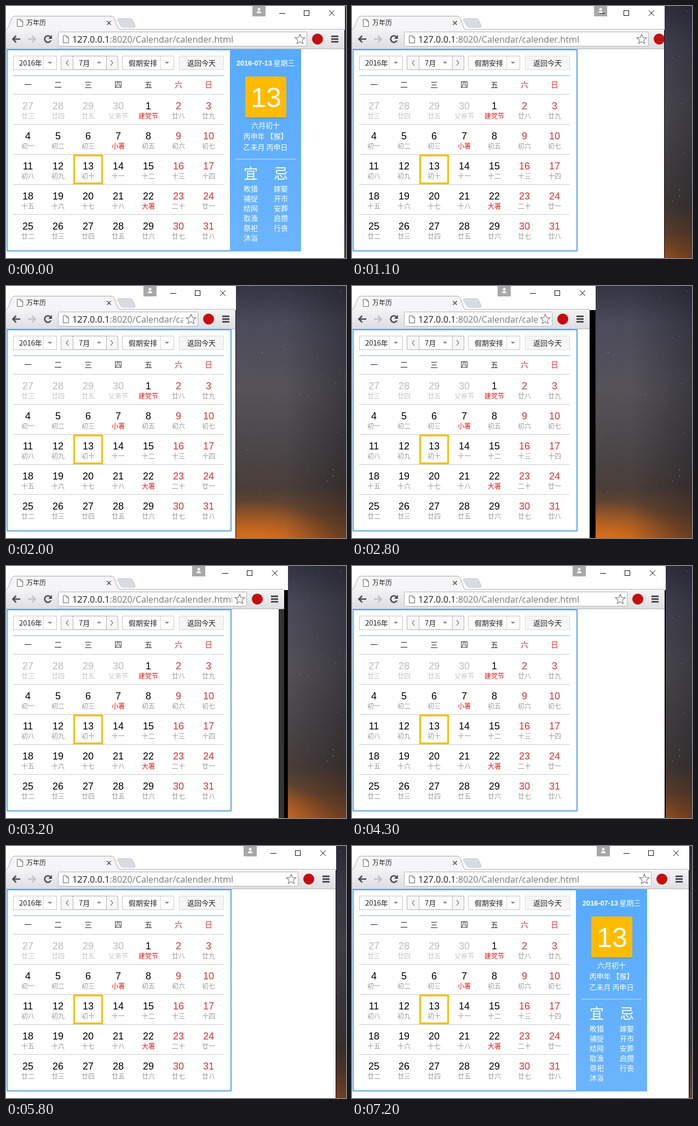
These frames come from a looping animation (621x461 px, 8000 ms). An HTML page:

```html
<!DOCTYPE html>
<html lang="zh">
<head>
<meta charset="utf-8">
<title>万年历</title>
<style>
  html, body { margin: 0; width: 100%; height: 100%; overflow: hidden; background: #222; }
  #stage { display: block; width: 621px; height: 461px; }
  text { font-family: "Noto Sans CJK SC", "Noto Sans CJK", sans-serif; white-space: pre; }
  .num { font-family: "Liberation Sans", Arial, sans-serif; }
  .url { font: 16.2px "Open Sans", "Noto Sans", sans-serif; fill: #777; }
  .line { fill: none; stroke-width: 1; }
  .crisp { shape-rendering: crispEdges; }
</style>
</head>
<body>
<svg id="stage" viewBox="0 0 621 461">
  <defs>
    <linearGradient id="sky" x2="0" y2="1">
      <stop offset="0" stop-color="#343543"/>
      <stop offset=".15" stop-color="#4b4b5a"/>
      <stop offset=".4" stop-color="#56535a"/>
      <stop offset=".65" stop-color="#4b4648"/>
      <stop offset=".8" stop-color="#4a3e38"/>
      <stop offset=".9" stop-color="#6e482d"/>
      <stop offset="1" stop-color="#a85a22"/>
    </linearGradient>
    <radialGradient id="glow" gradientUnits="userSpaceOnUse" cx="0" cy="0" r="1"
      gradientTransform="translate(455 472) scale(150 80)">
      <stop offset="0" stop-color="#e87618" stop-opacity=".85"/>
      <stop offset="1" stop-color="#e87618" stop-opacity="0"/>
    </radialGradient>
    <linearGradient id="shade">
      <stop offset=".82" stop-color="#14141c" stop-opacity="0"/>
      <stop offset="1" stop-color="#14141c" stop-opacity=".4"/>
    </linearGradient>
    <linearGradient id="bar" x2="0" y2="1">
      <stop offset="0" stop-color="#f4f4f6"/>
      <stop offset="1" stop-color="#dedee1"/>
    </linearGradient>
    <linearGradient id="blue" x2="0" y2="1">
      <stop offset="0" stop-color="#57aaff"/>
      <stop offset="1" stop-color="#6bb4ff"/>
    </linearGradient>
    <g id="doc" class="line" stroke="#666">
      <path d="M.5.5H7L10.500 4V13.500H.5ZM7 .5V4H10.500" fill="#fff"/>
    </g>
  </defs>

  <rect width="621" height="461" fill="url(#sky)"/>
  <rect width="621" height="461" fill="url(#glow)"/>
  <rect width="621" height="461" fill="url(#shade)"/>
  <g id="stars" fill="#a6a8cc"></g>

  <svg id="win" width="619" height="461">
    <rect width="621" height="461" fill="#fff"/>
    <rect y="44" width="621" height="417" fill="#000"/>

    <svg id="client" width="618" height="461">
      <rect width="621" height="461" fill="#fff"/>
      <rect y="43" width="621" height="35" fill="url(#bar)"/>
      <path class="crisp" d="M0 42.500H621M0 78.500H621" stroke="#b4b4b6"/>
      <path d="M203 24.500Q204 23 206 23H227Q230 23 231 25L236 36Q237 39 234 39H214Q211 39 210 37Z" fill="#d7dce2" stroke="#c3c7cc"/>
      <path d="M0 43.500Q3 42 4 39L11 22Q12.500 18.500 16 18.500H192Q196 18.500 197.500 22L204 39Q205.500 42 208 43.500Z" fill="#f5f5f7" stroke="#a8a8ab"/>
      <rect y="43" width="210" height="2" fill="#f4f4f6"/>
      <use href="#doc" x="20" y="24"/>
      <path d="M184.500 27.500L191.500 34.500M191.500 27.500L184.500 34.500" stroke="#555" stroke-width="1.700"/>

      <g fill="none" stroke-width="2.600">
        <path d="M26 60.500H13M18.500 54.500L12.500 60.500L18.500 66.500" stroke="#4c4c4c"/>
        <path d="M40 60.500H53M47.500 54.500L53.500 60.500L47.500 66.500" stroke="#c2c2c4"/>
        <path d="M81.500 57A6 6 0 1 0 82 63" stroke="#4c4c4c"/>
      </g>
      <path d="M84 53V60H77Z" fill="#4c4c4c"/>
      <rect id="omni" x="95.500" y="47.500" height="26" rx="2" width="454" fill="#fff" stroke="#b2b2b5"/>
      <use href="#doc" x="104" y="54"/>
      <svg id="address" x="96" y="48" width="430" height="25">
        <text class="url" x="25" y="19"><tspan fill="#1c1c1c">127.0.0.1</tspan>:8020/Calendar/calender.html</text>
      </svg>
      <g id="tools">
        <path id="star" transform="translate(-81 61)" fill="#fff" stroke="#808084" stroke-width="1.200"/>
        <circle cx="-49" cy="60.500" r="10" fill="#c70d0d"/>
        <path class="crisp" d="M-24 55.500H-11M-24 60.500H-11M-24 65.500H-11" stroke="#4c4c4c" stroke-width="3"/>
        <rect x="-168" width="24" height="19" fill="#a8a8a8"/>
        <circle cx="-156" cy="6" r="2.500" fill="#fff"/>
        <path d="M-160 13Q-160 9.500-156 9.500T-152 13Z" fill="#fff"/>
      </g>

      <svg id="page" y="79" width="618" height="382">
        <g id="calendar" transform="translate(0 -79)">
          <rect y="79" width="621" height="382" fill="#fff"/>
          <rect class="crisp" x="2" y="80" width="409" height="368" fill="#fff" stroke="#5ba5ea" stroke-width="2"/>
        </g>
        <g id="side" transform="translate(0 -79)">
          <rect x="409" y="79" width="130" height="370" fill="url(#blue)"/>
          <rect x="438" y="132" width="74" height="74" rx="3" fill="#3d82cc" opacity=".5"/>
          <rect x="437" y="129" width="75" height="75" rx="2" fill="#fb0"/>
          <rect x="419" y="279" width="110" height="2" fill="#97cbff"/>
        </g>
      </svg>
      <rect id="gap" y="79" width="0" height="382" fill="#333"/>
    </svg>

    <g id="buttons" class="crisp">
      <path d="M-119 13.500H-108M-73.500 8.500H-64.500V17.500H-73.500Z" fill="none" stroke="#111"/>
      <path d="M-28 8L-18 18M-18 8L-28 18" stroke="#111" shape-rendering="auto"/>
      <path d="M.5 44V461" stroke="#111"/>
    </g>
  </svg>
</svg>

<script>
const NS = "http://www.w3.org/2000/svg";
const get = id => document.getElementById(id);
const calendar = get("calendar"), side = get("side");

function add(parent, tag, attrs, content = "") {
  const node = document.createElementNS(NS, tag);
  for (const key in attrs) node.setAttribute(key, attrs[key]);
  node.textContent = content;
  parent.appendChild(node);
  return node;
}

// y is the optical middle of the line; baselines sit on whole pixels
function label(parent, content, x, y, size, fill, more = {}) {
  const baseline = Math.round(y + size * .365);
  add(parent, "text", { x, y: baseline, "font-size": size, fill, "text-anchor": "middle", ...more }, content);
}

const box = (x, y, width, height, fill, stroke = "#c4c4c6") =>
  add(calendar, "rect", { x: x + .5, y: y + .5, width, height, fill, stroke });
const rule = (d, stroke) => add(calendar, "path", { d, stroke, fill: "none", class: "crisp" });
const arrow = x => add(calendar, "path", { d: `M${x - 4} 102h8l-4 4z`, fill: "#8c8c8c" });

function drawControls() {
  const left = { "text-anchor": "start" };
  box(13, 91, 79, 25, "#fff");
  box(100, 91, 104, 25, "#fff", "#a9a6ad");
  box(100, 91, 22, 25, "#f6f6f6", "#b4b1b8");
  box(183, 91, 21, 25, "#f6f6f6", "#b4b1b8");
  box(212, 91, 94, 25, "#fff");
  box(316, 91, 81, 25, "#f6f6f6", "#dcdcdc");
  rule("M68.500 92v24M282.500 92v24", "#d5d5d5");
  add(calendar, "path", { d: "M114 99l-4 5 4 5M191 99l4 5-4 5", fill: "none", stroke: "#666", "stroke-width": 1.2 });
  [80, 170, 294].forEach(arrow);
  label(calendar, "2016年", 24, 104, 13, "#222", left);
  label(calendar, "7月", 133, 104, 13, "#222", left);
  label(calendar, "假期安排", 224, 104, 13, "#222", left);
  label(calendar, "返回今天", 357, 104, 13, "#222");
}

function drawDays() {
  const columnX = i => 40 + 55 * i;
  const red = "#dc3038";
  rule("M13 127.500H398", "#74b0e6");
  [..."一二三四五六日"].forEach((day, i) => label(calendar, day, columnX(i), 144, 14, i > 4 ? red : "#333"));
  const moons = ("廿三 廿四 廿五 父亲节 建党节 廿八 廿九 初一 初二 初三 小署 初五 初六 初七 初八 初九 初十 十一 " +
    "十二 十三 十四 十五 十六 十七 十八 大署 二十 廿一 廿二 廿三 廿四 廿五 廿六 廿七 廿八").split(" ");
  const feasts = ["建党节", "小署", "大署"];
  moons.forEach((moon, i) => {
    const x = columnX(i % 7), row = Math.floor(i / 7), y = 182 + 55 * row, past = i < 4;
    if (i % 7 === 0) rule(`M13 ${161.5 + 55 * row}H398`, "#ccc");
    label(calendar, past ? 27 + i : i - 3, x, y, 18, past ? "#bbb" : i % 7 > 4 ? red : "#000", { class: "num" });
    label(calendar, moon, x, y + 19.5, 12, past ? "#c2c2c2" : feasts.includes(moon) ? "#dc1a1a" : "#999");
  });
  add(calendar, "rect", { x: 124.5, y: 273.5, width: 51, height: 51, fill: "none", stroke: "#fb0", "stroke-width": 3 });
}

function drawSide() {
  const white = (content, x, y, size = 13, more) => label(side, content, x, y, size, "#fff", more);
  white("2016-07-13", 453.5, 104, 12.7, { class: "num", "font-weight": "bold" });
  white("星期三", 508, 104);
  white("13", 475, 167, 50, { class: "num" });
  white("六月初十", 474, 218);
  white("丙申年 【猴】", 474, 238);
  white("乙未月 丙申日", 474, 258);
  white("宜", 447, 307, 26);
  white("忌", 502, 307, 26);
  "畋猎 捕捉 结网 取渔 祭祀 沐浴".split(" ").forEach((word, i) => white(word, 447, 334 + 18 * i));
  "嫁娶 开市 安葬 启攒 行丧".split(" ").forEach((word, i) => white(word, 502, 334 + 18 * i));
}

function drawStars() {
  let seed = 7;
  const random = () => (seed = seed * 16807 % 2147483647) / 2147483647;
  for (let i = 0; i < 60; i++)
    add(get("stars"), "circle", { cx: 430 + random() * 190, cy: random() * 390, r: .4 + random() * .5, opacity: .3 + random() * .5 });
}

function drawFavourite() {
  const points = Array.from({ length: 10 }, (_, i) => {
    const r = i % 2 ? 4.2 : 9.5, a = i * Math.PI / 5;
    return `${(r * Math.sin(a)).toFixed(1)} ${(-r * Math.cos(a)).toFixed(1)}`;
  });
  get("star").setAttribute("d", `M${points.join("L")}Z`);
}

label(get("client"), "万年历", 55, 31, 12, "#222");
drawControls();
drawDays();
drawSide();
drawStars();
drawFavourite();

// Width of the window frame over time; its contents follow late.
const frameKeys = [[900, 618], [1000, 600], [1100, 570], [1400, 486], [1600, 448], [1700, 429], [1800, 443],
  [1900, 437], [2000, 419], [2200, 419], [2300, 437], [2400, 417], [2500, 417], [2600, 420], [2800, 444],
  [3200, 514], [3400, 561], [3800, 578], [3900, 578], [4000, 567], [4300, 572], [4700, 593], [4800, 588],
  [4900, 590], [5300, 617], [5700, 604], [5800, 602], [6700, 602], [7200, 615]];
const clientKeys = [[1000, 618], [1100, 610], [1400, 561], [1700, 450], [1800, 443], [1900, 437], [2000, 419],
  [2200, 419], [2300, 430], [2400, 417], [2600, 417], [2800, 434], [3200, 508], [3400, 549], [3800, 578],
  [3900, 578], [4000, 567], [4300, 571], [4700, 591], [4800, 588], [5300, 610], [5700, 604], [5800, 602],
  [6700, 602], [7200, 615]];

function valueAt(keys, time) {
  const next = keys.findIndex(key => key[0] > time);
  if (next === 0) return keys[0][1];
  if (next < 0) return keys[keys.length - 1][1];
  const [t0, v0] = keys[next - 1], [t1, v1] = keys[next];
  return Math.round(v0 + (v1 - v0) * (time - t0) / (t1 - t0));
}

const setWidth = (id, width) => get(id).setAttribute("width", width);
const moveTo = (id, x) => get(id).setAttribute("transform", `translate(${x} 0)`);

function render(now) {
  const time = Math.floor(now % 8000 / 100) * 100;
  const frame = valueAt(frameKeys, time), client = valueAt(clientKeys, time);
  const gap = time >= 3100 && time <= 3300 ? 10 : 0;
  setWidth("win", frame + 1);
  setWidth("client", client);
  setWidth("page", client - gap);
  setWidth("gap", gap);
  get("gap").setAttribute("x", client - gap);
  setWidth("omni", client - 164);
  setWidth("address", client - 191);
  moveTo("tools", client);
  moveTo("buttons", frame);
  side.style.display = client >= 613 ? "" : "none";
}

const start = performance.now();
function tick() {
  render(performance.now() - start);
  requestAnimationFrame(tick);
}
tick();
</script>
</body>
</html>
```
